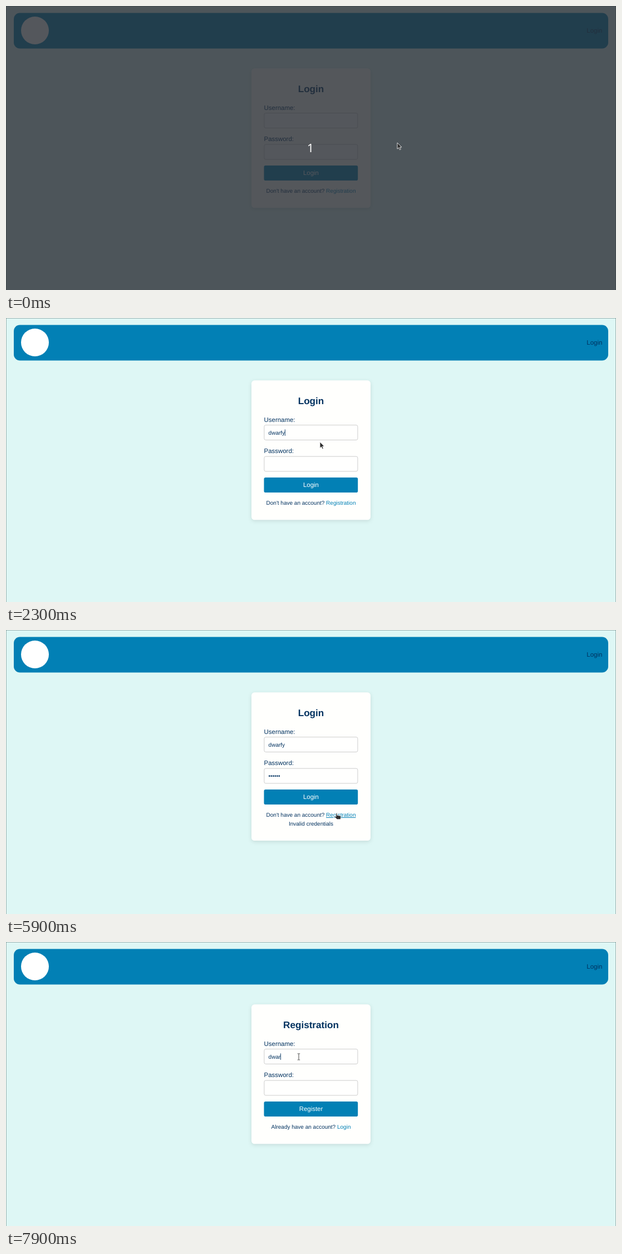
An HTML page that plays this animation: 1096x511 px, repeating every 8 s.

```html
<!DOCTYPE html>
<html lang="en">
<head>
<meta charset="utf-8">
<title>Login form</title>
<style>
  html, body { margin: 0; width: 100%; height: 100%; overflow: hidden; background: #def7f5; }
  svg { display: block; width: 1096px; height: 511px; }
  text { font: 11.43px "Liberation Sans", Arial, sans-serif; fill: #023260; white-space: pre; text-rendering: geometricPrecision; }
  .title { font-size: 17.14px; font-weight: bold; }
  .small { font-size: 10px; }
  .mid { text-anchor: middle; }
  .blue { fill: #0280b5; }
  .field { fill: #fffffe; stroke: #c8c8c8; stroke-width: .9; }
  #card { fill: #fffffd; filter: drop-shadow(0 2.5px 3.5px rgba(0, 0, 0, .11)); }
  #count { font: 21px "Noto Sans", "Open Sans", sans-serif; fill: #fff; }
</style>
</head>
<body>
<svg viewBox="0 0 1096 511">
  <rect width="1096" height="511" fill="#def7f5"/>
  <rect class="blue" x="14" y="12.5" width="1068" height="64" rx="11"/>
  <circle cx="52" cy="44" r="25" fill="#fff"/>
  <text x="1071.3" y="48" text-anchor="end">Login</text>

  <rect id="card" x="441" y="112.3" width="214" height="251" rx="5.5"/>
  <text id="title" class="title mid" x="548" y="154.5"></text>
  <text x="463.6" y="187">Username:</text>
  <rect class="field" x="463.9" y="192.7" width="168" height="26.8" rx="2.8"/>
  <text x="463.6" y="243.2">Password:</text>
  <rect class="field" x="463.9" y="249.1" width="168" height="26.8" rx="2.8"/>
  <text id="user" class="small" x="471.6" y="209.6"></text>
  <text id="pass" class="small" x="471.6" y="266"></text>
  <rect id="caret" width=".9" height="11.5" fill="#023260"/>
  <g id="button">
    <rect class="blue" x="463.5" y="287" width="168.7" height="27" rx="2.8"/>
    <text id="action" class="mid" x="548" y="304" style="fill:#fff"></text>
  </g>
  <text class="small mid" x="548" y="336"><tspan id="hint"></tspan><tspan id="link" class="blue"></tspan></text>
  <text id="error" class="small mid" x="548" y="351.8">Invalid credentials</text>
  <rect x=".25" y=".25" width="1095.5" height="520" fill="none" stroke="#405858" stroke-opacity=".7" stroke-width=".7"/>

  <g id="overlay">
    <rect width="1096" height="511" fill="#2a2d34" fill-opacity=".8"/>
    <text id="count" class="mid" x="547" y="263.3">1</text>
  </g>

  <g id="cursor" fill="#2e2e2e" stroke="#fff" stroke-width=".8" stroke-linejoin="round">
    <path id="arrow" d="M0 0V11.2L2.6 8.8L4.4 12.7L6.3 11.8L4.6 8H8Z"/>
    <path id="hand" d="M-1 .8Q0 -.4 1 .8V4.2L6.2 5.2Q8 5.6 7.8 7.4L7 11.8H.8L-3.4 7.4Q-3.6 5.8 -2.2 6L-1 7Z"/>
    <path id="beam" d="M-2.2 -5.6H-.7L0 -5L.7 -5.6H2.2M0 -5V5M-2.2 5.6H-.7L0 5L.7 5.6H2.2" fill="none" stroke="#444" stroke-width="1"/>
  </g>
</svg>
<script>
const LOOP = 8000, STEP = 100;
const el = Object.fromEntries([...document.querySelectorAll('[id]')].map(e => [e.id, e]));

// Key presses
const loginKeys = [1100, 1200, 1300, 1800, 2000, 2200];
const passKeys = [3200, 3500, 3700, 4000, 4200, 4500];
const registerKeys = [7100, 7200, 7300, 7700];

// Pointer: time, x, y
const path = [
  [0, 703, 246], [200, 703, 246], [800, 561, 207], [2100, 561, 207],
  [2300, 564, 223], [2600, 560, 262], [4100, 560, 262], [4300, 561, 262],
  [4400, 561, 262], [4700, 558, 291], [5000, 558, 293], [5300, 558, 293],
  [5900, 594, 329], [6100, 597, 330], [6200, 597, 330], [6300, 549, 244],
  [6400, 538, 222], [6500, 538, 222], [6700, 525, 204], [6900, 525, 204],
  [7000, 526, 206.5], [LOOP, 526, 206.5]
];

const within = (v, from, to) => v >= from && v < to;
const pressed = (keys, t) => keys.filter(k => k <= t).length;
const show = (e, on) => e.setAttribute('visibility', on ? 'inherit' : 'hidden');
const write = (e, s) => { if (e.textContent !== s) e.textContent = s; };

function pointerAt(t) {
  const i = path.findIndex(p => p[0] > t);
  const [t0, x0, y0] = path[i - 1], [t1, x1, y1] = path[i];
  const k = (t - t0) / (t1 - t0);
  return [x0 + (x1 - x0) * k, y0 + (y1 - y0) * k];
}

function placeCaret(t) {
  const inPass = within(t, 2700, 4900);
  const field = inPass ? el.pass : el.user;
  show(el.caret, within(t, 900, 4900) || t >= 7000);
  el.caret.setAttribute('x', 471.4 + (field.textContent ? field.getComputedTextLength() : 0));
  el.caret.setAttribute('y', inPass ? 256.9 : 200.5);
}

function placePointer(t) {
  const [x, y] = pointerAt(t);
  const inForm = within(x, 463, 632);
  const overField = inForm && (within(y, 192.5, 220) || within(y, 249, 276));
  const overButton = inForm && within(y, 286, 314);
  const overLink = within(x, 575, 629) && within(y, 326, 339);
  const typing = within(t, 900, 2200) || within(t, 2700, 4000) || within(t, 7100, 7900);
  el.cursor.setAttribute('transform', `translate(${x} ${y})`);
  show(el.cursor, !typing);
  show(el.beam, overField);
  show(el.hand, overButton || overLink);
  show(el.arrow, !overField && !overButton && !overLink);
  el.button.setAttribute('transform', `translate(0 ${overButton ? -1.5 : 0})`);
  el.link.style.textDecoration = overLink ? 'underline' : 'none';
}

function render(time) {
  const t = Math.floor(time / STEP) * STEP;
  const registering = t >= 6300;
  const failed = within(t, 5000, 6300);
  write(el.title, registering ? 'Registration' : 'Login');
  write(el.action, registering ? 'Register' : 'Login');
  write(el.hint, registering ? 'Already have an account? ' : "Don't have an account? ");
  write(el.link, registering ? 'Login' : 'Registration');
  write(el.user, 'dwarfy'.slice(0, pressed(registering ? registerKeys : loginKeys, t)));
  write(el.pass, registering ? '' : '•'.repeat(pressed(passKeys, t)));
  el.card.setAttribute('height', failed ? 266.8 : 251);
  show(el.error, failed);
  show(el.overlay, t < 100);
  placeCaret(t);
  placePointer(t);
}

const start = performance.now();
function tick() {
  render((performance.now() - start) % LOOP);
  requestAnimationFrame(tick);
}
tick();
</script>
</body>
</html>
```
